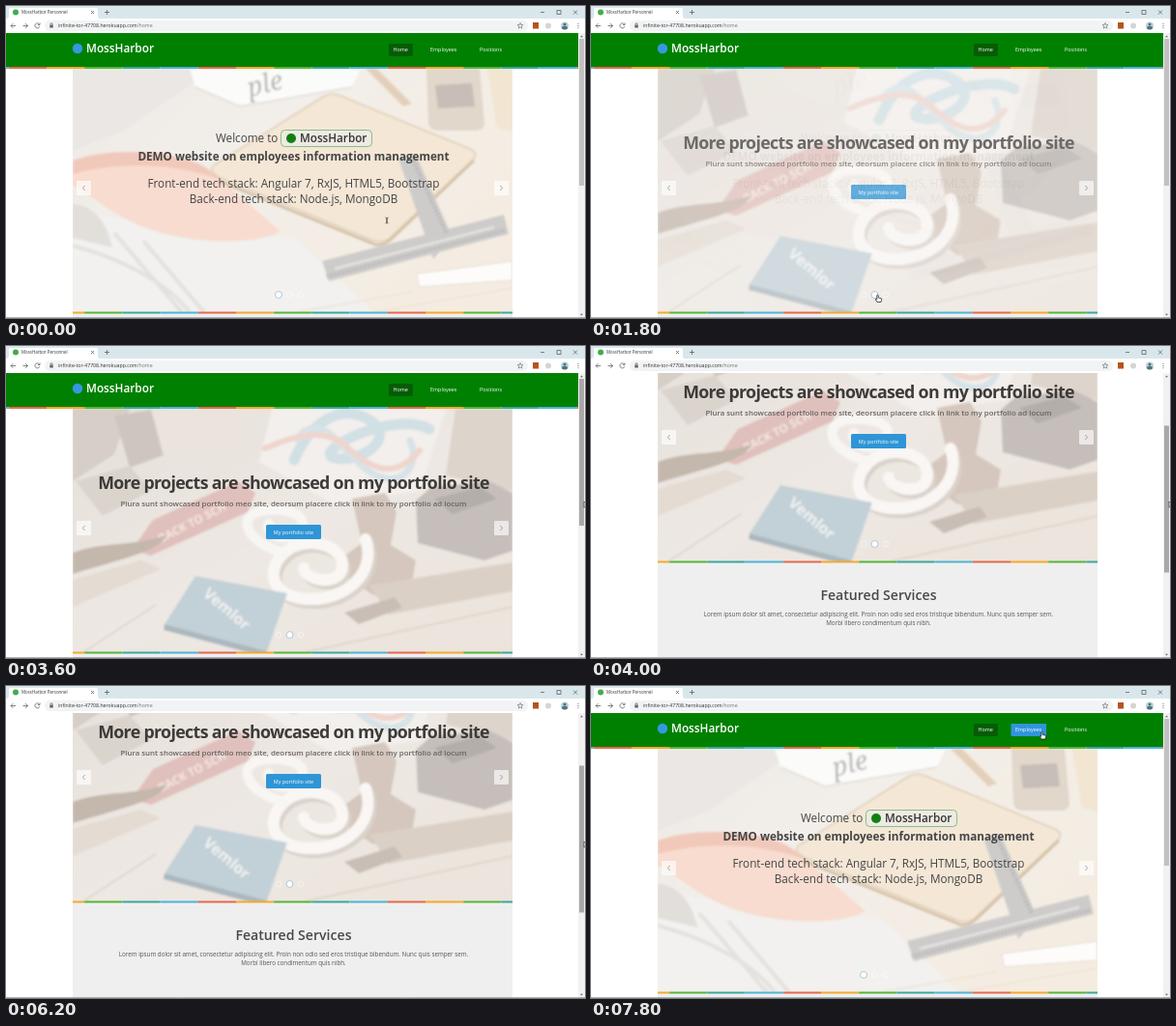
Recreate the animation shown at these times as an HTML page. Size 599x323 px, loop 8 s.

```html
<!DOCTYPE html>
<html lang="en">
<head>
<meta charset="utf-8">
<title>Workforce site tour</title>
<style>
  html, body { margin: 0; width: 100%; height: 100%; overflow: hidden; background: #fff; }
  svg { display: block; width: 599px; height: 323px; font-family: "Open Sans", sans-serif; }
  text { white-space: pre; }
  .mid { text-anchor: middle; }
  .semi { font-weight: 600; }
  .bold { font-weight: 700; }
  .nav { font-size: 5.45px; fill: #fff; }
  .lead { font-size: 11.7px; fill: #444; }
  .small { font-size: 5.45px; fill: #777; }
  .line { fill: none; stroke: #5f6368; stroke-width: .8; }
</style>
</head>
<body>
<svg viewBox="0 0 599 323">
  <defs>
    <pattern id="stripes" x="42" y="0" width="196" height="600" patternUnits="userSpaceOnUse">
      <rect width="39.2" height="600" fill="#f5a92c"/>
      <rect x="39.2" width="39.2" height="600" fill="#55b53a"/>
      <rect x="78.4" width="39.2" height="600" fill="#3aa89c"/>
      <rect x="117.6" width="39.2" height="600" fill="#4db4d6"/>
      <rect x="156.8" width="39.2" height="600" fill="#e4694a"/>
    </pattern>
    <clipPath id="stage"><rect x="69" y="65" width="455" height="252"/></clipPath>
    <linearGradient id="desk" x2="1" y2=".6">
      <stop offset="0" stop-color="#e9e7e3"/><stop offset=".45" stop-color="#f0ebe5"/><stop offset="1" stop-color="#f3e9dc"/>
    </linearGradient>
    <linearGradient id="bench" x2="1" y2="1">
      <stop offset="0" stop-color="#dcd6cf"/><stop offset=".5" stop-color="#e9e4de"/><stop offset="1" stop-color="#e6ddd2"/>
    </linearGradient>
    <filter id="soft"><feGaussianBlur stdDeviation=".9"/></filter>
  </defs>

  <rect width="599" height="323" fill="#fff"/>

  <g id="page">
    <!-- header -->
    <rect y="28" width="592" height="35" fill="#008000"/>
    <circle cx="74" cy="44" r="5.2" fill="#3499e0"/>
    <text class="semi" x="83" y="48" font-size="11.8" fill="#fff">MossHarbor</text>
    <rect x="396" y="39" width="25" height="13" rx="1" fill="#065c06"/>
    <rect id="hover" x="434.500" y="39" width="36.500" height="13" rx="1" fill="#2f95dc"/>
    <text class="nav" x="400.500" y="47.300">Home</text>
    <text class="nav" x="439" y="47.300">Employees</text>
    <text class="nav" x="490" y="47.300">Positions</text>

    <!-- carousel -->
    <g clip-path="url(#stage)">
      <g id="slide1">
        <g filter="url(#soft)">
          <rect x="60" y="55" width="475" height="275" fill="url(#desk)"/>
          <path d="M69 65H215L120 130 69 150z" fill="#e6e3df"/>
          <path d="M69 212C140 225 230 235 300 240L380 317H69z" fill="#efeeec"/>
          <path d="M69 160C110 144 190 150 213 172L284 233C260 248 190 248 140 228 108 215 88 195 69 186z" fill="#f6d6c6"/>
          <path d="M69 160C110 144 190 150 213 172L222 180C170 160 110 163 69 174z" fill="#eebfae"/>
          <path d="M112 235L182 317M142 243L205 317M69 248C120 262 165 285 190 317" fill="none" stroke="#e0dcd8" stroke-width="4"/>
          <path d="M69 205C90 205 105 225 110 250L69 240z" fill="#ddd9d5"/>
          <path d="M190 65H367L358 84 242 104 196 84z" fill="#fafaf9"/>
          <path d="M196 84L242 104 358 84" fill="none" stroke="#dcd6cf" stroke-width="1.500"/>
          <text x="252" y="94" font-size="27" font-style="italic" fill="#a9a7a5" font-family="Noto Serif, serif" transform="rotate(-14 252 94)">ple</text>
          <path d="M215 165L328 94Q336 89 346 93L480 148Q490 153 482 160L397 240Q390 246 378 242L222 178Q208 170 215 165z" fill="#f2e3cf" stroke="#d9c5a8" stroke-width="1.500"/>
          <path d="M220 181L382 247Q392 248 400 240L484 160" fill="none" stroke="#cfb696" stroke-width="3"/>
          <path d="M372 65L384 65 420 101 411 104z" fill="#dfc8ae"/>
          <path d="M435 65H490L495 122Q494 129 486 129H446Q438 128 437 121z" fill="#dcd0c2"/>
          <path d="M444 82L482 80 485 104 447 106z" fill="#bcb3aa"/>
          <path d="M498 65H524V130L508 126z" fill="#efe0c9"/>
          <g fill="#c4c3c1">
            <path d="M406 158L424 154 462 240 442 262z"/><path d="M327 264L515 216 520 236 334 285z"/>
          </g>
          <g fill="none" stroke="#8f8e8c" stroke-width="4" stroke-dasharray="1 3">
            <path d="M420 157L456 236"/><path d="M332 280L517 232"/>
          </g>
          <path d="M340 272L505 229" stroke="#e5e4e2" stroke-width="2"/>
          <path d="M425 277L524 264V284L427 291z" fill="#fcfbfa" stroke="#ddd2c4"/>
          <path d="M380 317L524 292M300 317L420 296" stroke="#e4d6c3" fill="none"/>
        </g>
        <rect x="69" y="65" width="455" height="252" fill="#fff" opacity=".15"/>
        <text class="lead" x="217" y="141">Welcome to</text>
        <rect x="284.500" y="128.500" width="94" height="17" rx="4" fill="#eeeae4" stroke="#6cb36c" stroke-width=".8"/>
        <circle cx="295" cy="137" r="5" fill="#118011"/>
        <text class="semi" x="304" y="141" font-size="11.700" fill="#333">MossHarbor</text>
        <text class="mid lead bold" x="297.500" y="159.500">DEMO website on employees information management</text>
        <text class="mid lead" x="297.500" y="188">Front-end tech stack: Angular 7, RxJS, HTML5, Bootstrap</text>
        <text class="mid lead" x="297.500" y="204">Back-end tech stack: Node.js, MongoDB</text>
      </g>

      <g id="slide2">
        <g filter="url(#soft)">
          <rect x="60" y="55" width="475" height="275" fill="url(#bench)"/>
          <path d="M69 65H128L112 112 69 140z" fill="#c4bbb2"/>
          <path d="M112 72L150 66 166 112 128 126z" fill="#b9aea5"/>
          <path d="M72 140L128 124 150 150 100 176z" fill="#cdc4bb"/>
          <path d="M150 65H265L235 118 165 122z" fill="#e4ddd5"/>
          <path d="M275 65H455L428 150 338 163 262 120z" fill="#f2efeb"/>
          <g fill="none" stroke-linecap="round">
            <path d="M298 118C318 72 352 60 378 78S366 122 340 116 400 66 438 86" stroke="#bdd7e1" stroke-width="11"/>
            <path d="M300 96C330 64 346 110 376 130S430 126 418 98" stroke="#c6dce3" stroke-width="7"/>
            <path d="M268 106C300 92 330 84 352 104S400 142 428 108" stroke="#ebc6ba" stroke-width="6"/>
          </g>
          <path d="M465 65H524V150L455 134z" fill="#d0c5b9"/>
          <path d="M424 160L440 146 500 140 524 152V212L495 222 426 204z" fill="#aaa39d"/>
          <path d="M443 158L490 146 508 158 462 174z" fill="#8f8984"/>
          <path d="M130 211L152 180 240 140 258 152 250 172 150 217z" fill="#d5a5a0"/>
          <text class="bold" x="160" y="204" font-size="12" fill="#f1e2dc" transform="rotate(-27 160 204)">BACK TO SCH</text>
          <path d="M69 214C100 202 130 208 166 196 160 212 122 220 69 236z" fill="#a99788"/>
          <path d="M69 242L140 222 160 231 69 270z" fill="#dacfc3"/>
          <path d="M358 158L392 152 404 172 398 206 424 222 420 246 380 258 350 238 352 216 368 204z" fill="#c3b1a2"/>
          <path d="M376 248L524 224V254L396 278z" fill="#cdbfb0"/>
          <path d="M350 276L402 260 410 271 365 288z" fill="#b0a398"/>
          <g fill="none" stroke-linecap="round">
            <path d="M372 200C384 236 350 264 312 262S268 232 288 214 346 204 348 226 312 246 308 230" stroke="#cbc2b8" stroke-width="12" transform="translate(3 4)"/>
            <path d="M372 200C384 236 350 264 312 262S268 232 288 214 346 204 348 226 312 246 308 230" stroke="#fbfaf8" stroke-width="12"/>
            <path d="M288 214C246 204 236 172 270 170S316 182 300 194 268 192 272 184" stroke="#faf9f6" stroke-width="10"/>
          </g>
          <path d="M196 238L291 256 270 316 164 288z" fill="#a6bfcb"/>
          <path d="M164 288L270 316 268 322 163 294z" fill="#8199a5"/>
          <text class="bold" x="203" y="258" font-size="16" fill="#eef3f5" transform="rotate(40 203 258)">Vemlor</text>
          <path d="M310 317L524 270M80 317L155 268" stroke="#d4c8b9" stroke-width="2"/>
        </g>
        <rect x="69" y="65" width="455" height="252" fill="#f3efeb" opacity=".36"/>
        <text class="mid bold" x="297.500" y="148" font-size="17.800" letter-spacing="-.66" fill="#3d3a38">More projects are showcased on my portfolio site</text>
        <text class="mid semi" x="297.500" y="166" font-size="7.830" fill="#676361">Plura sunt showcased portfolio meo site, deorsum placere click in link to my portfolio ad locum</text>
        <rect x="269" y="185" width="57" height="15" rx="1.500" fill="#2f95d6"/>
        <text class="mid nav" x="297.500" y="194.500">My portfolio site</text>
      </g>

      <g fill="#fff" fill-opacity=".65">
        <rect x="73" y="181" width="15" height="15" rx="1"/>
        <rect x="505" y="181" width="15" height="15" rx="1"/>
        <path class="line" d="M81.700 186l-2.300 2.500 2.300 2.500M511.300 186l2.300 2.500-2.300 2.500" opacity=".7"/>
      </g>
      <g id="dots"></g>
    </g>

    <!-- services -->
    <rect x="69" y="317" width="455" height="207" fill="#efefef"/>
    <g class="mid" fill="#555">
      <text class="semi" x="297.500" y="357" font-size="14.100" fill="#484848">Featured Services</text>
      <text x="297.500" y="373.700" font-size="6.260">Lorem ipsum dolor sit amet, consectetur adipiscing elit. Proin non odio sed eros tristique bibendum. Nunc quis semper sem.</text>
      <text x="297.500" y="383" font-size="6.260">Morbi libero condimentum quis nibh.</text>
      <g font-size="7.850" class="semi" fill="#444">
        <text x="180.500" y="471">Employees</text><text x="414" y="471">Positions</text>
      </g>
      <text class="small" x="180.500" y="488">Deorsum placere click in link to my portfolio ad locum</text>
      <text class="small" x="414" y="488">Deorsum placere click in link to my portfolio ad locum</text>
    </g>
    <circle cx="180.500" cy="438" r="22" fill="#fff"/>
    <circle cx="414" cy="438" r="22" fill="#fff"/>
    <g fill="#2f95d6" stroke="#fff" stroke-width=".8">
      <circle cx="173.500" cy="431.500" r="3.200"/><circle cx="187.500" cy="431.500" r="3.200"/>
      <path d="M169.500 441v-3q0-3 3-3h16q3 0 3 3v3z"/>
      <circle cx="180.500" cy="433.500" r="4.600"/>
      <path d="M172.500 447.500v-4q0-5 4.500-5h7q4.500 0 4.500 5v4q-1 1-3 1h-10q-2 0-3-1z"/>
    </g>
    <path d="M404 431.500h3.500m1.500 0h15M404 435.800h3.500m1.500 0h15M404 440.100h3.500m1.500 0h15M404 444.400h3.500m1.500 0h15" stroke="#2f95d6" stroke-width="2.700"/>

    <!-- footer -->
    <rect y="524" width="592" height="60" fill="#008000"/>
    <text x="68" y="553.700" font-size="5.450" fill="#b5d9b5">Copyright © 2015 Company Name. Design by <tspan fill="#fff">PageskinMeadow</tspan></text>
    <g id="social"></g>

    <g fill="url(#stripes)">
      <rect y="63" width="592" height="2"/>
      <rect x="69" y="316.500" width="455" height="2"/>
      <rect y="523.500" width="592" height="2"/>
    </g>
  </g>

  <!-- scrollbar -->
  <rect x="592" y="28" width="7" height="295" fill="#f1f1f1"/>
  <path d="M594 32.200l1.500-1.700 1.500 1.700zM594 318.800l1.500 1.700 1.500-1.700z" fill="#666"/>
  <rect id="thumb" x="593" y="34" width="5" height="152" fill="#c1c1c1"/>

  <!-- browser window -->
  <rect width="599" height="13" fill="#d9e7ec"/>
  <path d="M1 13Q3 13 3 10V4Q3 2 5 2H93Q95 2 95 4V10Q95 13 97 13z" fill="#fff"/>
  <rect y="13" width="599" height="15" fill="#fff"/>
  <rect x="40" y="15" width="500" height="11" rx="5.500" fill="#f1f3f4"/>
  <circle cx="10" cy="6.500" r="3" fill="#3fae49"/>
  <text x="16" y="8.200" font-size="4.450" fill="#333">MossHarbor Personnel</text>
  <g class="line">
    <path d="M88 5l3 3m0-3l-3 3M102 6.500h5m-2.500-2.500v5M553 6.500h4M570 4.500h4v4h-4zM587 4.500l4 4m0-4l-4 4"/>
    <path d="M10 20.500H5m2.300-2.300L5 20.500l2.300 2.300M17.500 20.500h5m-2.300-2.300l2.300 2.300-2.300 2.300M34.500 19a2.500 2.500 0 1 0 .3 2.200M35 17.500v2h-2"/>
    <path d="M46 19.800v-1a1 1 0 0 1 2 0v1"/>
    <path d="M532 17.500l.8 2 2.100.1-1.600 1.400.5 2.100-1.800-1.200-1.800 1.200.5-2.100-1.600-1.400 2.100-.1z" stroke-width=".6"/>
  </g>
  <rect x="45.300" y="19.700" width="3.400" height="2.800" fill="#5f6368"/>
  <text x="54" y="22.300" font-size="5.200" fill="#333">infinite-tor-47708.herokuapp.com<tspan fill="#777">/home</tspan></text>
  <rect x="545" y="17" width="6" height="6.500" fill="#b5541c"/>
  <circle cx="561" cy="20.500" r="3" fill="#d5d5d5"/>
  <circle cx="578" cy="20.500" r="4" fill="#b9d3dc"/>
  <path d="M575 23.200q0-2.400 3-2.400t3 2.400q-3 2.500-6 0z" fill="#50707c"/>
  <circle cx="578" cy="19" r="1.500" fill="#50707c"/>
  <path d="M592 17.800v1m0 1.200v1m0 1.200v1" stroke="#5f6368"/>
  <rect y="322.300" width="599" height=".7" fill="#87979a"/>

  <g id="cursor" stroke-linejoin="round">
    <path data-kind="beam" d="M-1.500-3Q0-3 0-2V2Q0 3-1.500 3M1.500-3Q0-3 0-2V2Q0 3 1.500 3" fill="none" stroke="#333" stroke-width=".7"/>
    <path data-kind="arrow" d="M0 0V6.200l1.400-1.300 1 2.100.9-.4-1-2.100h2z" fill="#fff" stroke="#222" stroke-width=".6"/>
    <path data-kind="hand" d="M-.7 0Q0-.8.700 0V2.500L3.800 3.200Q4.300 3.500 4.200 4.300L3.500 7H-.5L-2.300 4.200Q-2.200 3.400-1.400 3.800L-.7 4.400z" fill="#fff" stroke="#111" stroke-width=".7"/>
  </g>
</svg>

<script>
const LOOP = 8000, STEP = 200, MAX_SCROLL = 254, THUMB_TRAVEL = 131;
const byId = id => document.getElementById(id);

const scrollKeys = [[3600, 0], [4000, 94], [4800, 250], [5000, 254], [5400, 254], [6200, 94], [6600, 0]];
const slideKeys = [[1200, 0], [2000, 1], [6700, 1], [7400, 0]];
const cursorX = [[200, 394], [1200, 296.5], [2200, 296.5], [3200, 598], [6600, 598], [7600, 466.5]];
const cursorY = [[200, 222], [1200, 299.5], [2200, 299.5], [3200, 161], [6600, 161], [7600, 48]];

function valueAt(keys, t) {
  if (t <= keys[0][0]) return keys[0][1];
  const next = keys.findIndex(key => key[0] >= t);
  if (next < 0) return keys[keys.length - 1][1];
  const [t0, v0] = keys[next - 1], [t1, v1] = keys[next];
  return v0 + (v1 - v0) * (t - t0) / (t1 - t0);
}

function cursorKind(t) {
  if (t < 400) return "beam";
  return (t >= 1200 && t <= 2200) || t >= 7400 ? "hand" : "arrow";
}

byId("dots").innerHTML = [282, 293.5, 305].map(x => `<circle cx="${x}" cy="299"/>`).join("");
byId("social").innerHTML = [388, 404.5, 421, 437].map(x =>
  `<circle cx="${x}" cy="553.5" r="6" fill="none" stroke="#d9ecd9" stroke-width=".9"/>
   <circle cx="${x}" cy="553.5" r="2.6" fill="#fff"/>`).join("");

function render(time) {
  const t = Math.floor(time % LOOP / STEP) * STEP;
  const scroll = valueAt(scrollKeys, t);
  const fade = valueAt(slideKeys, t);

  byId("page").setAttribute("transform", `translate(0 ${-scroll})`);
  byId("thumb").setAttribute("y", 34 + scroll / MAX_SCROLL * THUMB_TRAVEL);
  byId("thumb").setAttribute("fill", t >= 3200 && t <= 6600 ? "#a8a8a8" : "#c1c1c1");
  byId("slide1").setAttribute("opacity", 1 - fade);
  byId("slide2").setAttribute("opacity", fade);
  byId("hover").setAttribute("opacity", t >= 7600 ? 1 : 0);

  const active = t >= 1400 && t < 6800 ? 1 : 0;
  [...byId("dots").children].forEach((dot, i) => {
    const on = i === active;
    dot.setAttribute("r", on ? 3.5 : 2.8);
    dot.setAttribute("fill", on ? "#fff" : "none");
    dot.setAttribute("stroke", on ? "#adc8d9" : "#fff");
    dot.setAttribute("opacity", on ? 1 : .45);
  });

  byId("cursor").setAttribute("transform", `translate(${valueAt(cursorX, t)} ${valueAt(cursorY, t)})`);
  for (const shape of byId("cursor").children)
    shape.setAttribute("visibility", shape.dataset.kind === cursorKind(t) ? "visible" : "hidden");
}

const start = performance.now();
function tick() {
  render(performance.now() - start);
  requestAnimationFrame(tick);
}
tick();
</script>
</body>
</html>
```
